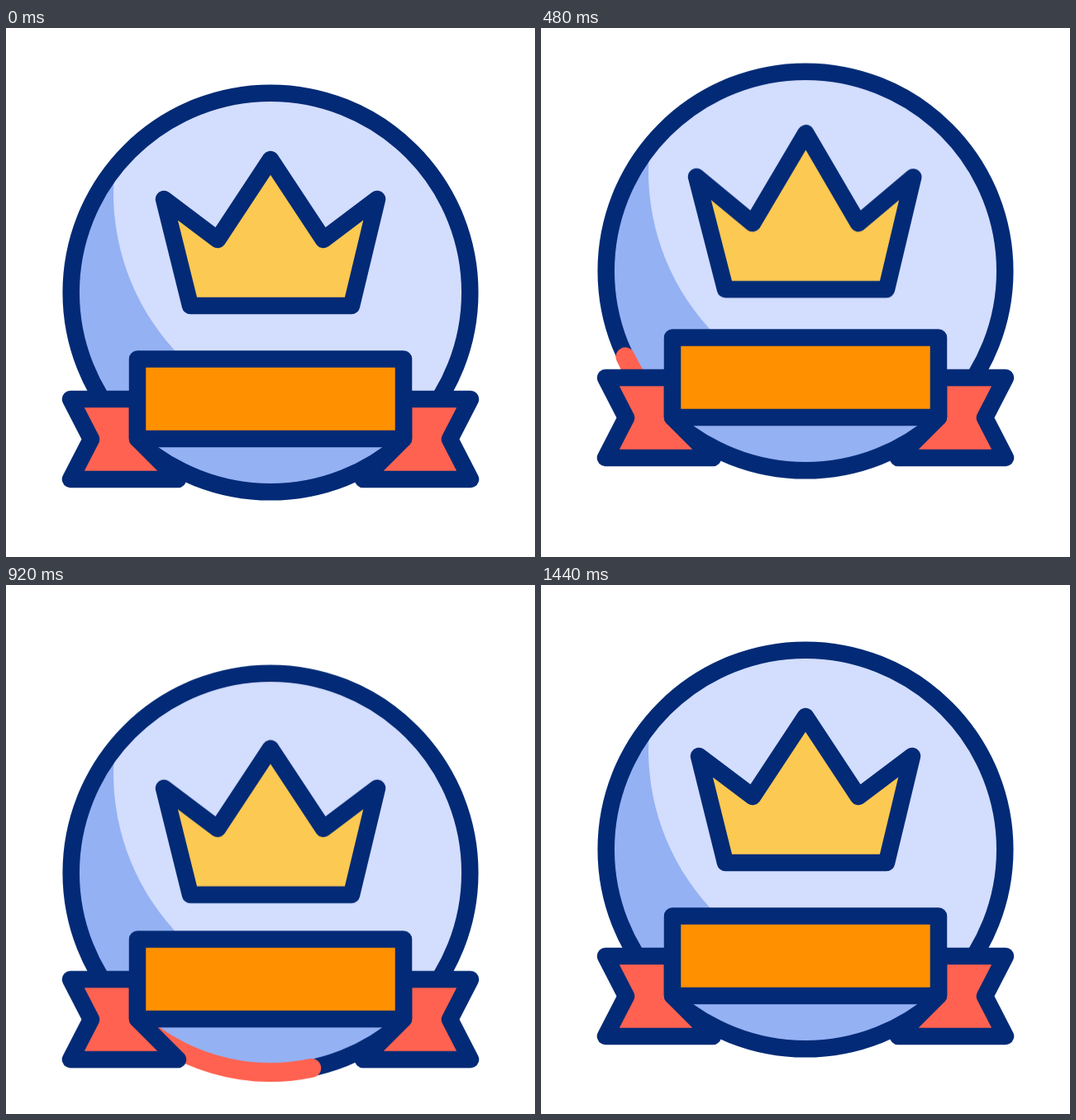
Animation, 640 px wide and 640 px high, one loop 1480 ms. Source, as an HTML page:

```html
<!DOCTYPE html>
<html lang="en">
<head>
<meta charset="utf-8">
<title>Crown badge</title>
<style>
  @property --head { syntax: "<length>"; inherits: false; initial-value: 0px; }
  @property --tail { syntax: "<length>"; inherits: false; initial-value: 0px; }

  html, body { margin: 0; width: 100%; height: 100%; overflow: hidden; background: #fff; }
  svg { display: block; width: 100%; height: 100%; }

  :root {
    --navy: #022a76;
    --coral: #ff6250;
    --ease: cubic-bezier(.3333, 0, .6667, 1);
    --loop: 1480ms var(--ease) infinite;
  }

  .line { stroke: var(--navy); stroke-width: 20.5; stroke-linejoin: round; }
  .badge { animation: bob var(--loop); }
  .crown { animation: dip var(--loop); }
  .spikes {
    fill: #fcc952;
    d: path("M223 336L191 207L256 256L320 159L384 256L449 207L418 336Z");
    animation: stretch var(--loop);
  }
  .ribbon {
    fill: var(--coral);
    d: path("M159 449H78L103 497.5L78 546H208L159 497Z");
    animation: flap var(--loop);
  }
  .sweep {
    fill: none;
    stroke: var(--coral);
    stroke-width: 23;
    stroke-linecap: round;
    stroke-dasharray: calc(var(--head) - var(--tail)) 720px;
    stroke-dashoffset: calc(0px - var(--tail));
    animation: head var(--loop), tail var(--loop);
  }

  @keyframes bob {
    0%, 2.7% { transform: translateY(0); }
    32.8% { transform: translateY(-26px); }
    63.85% { transform: translateY(28.5px); }
    94.6%, 100% { transform: translateY(0); }
  }
  @keyframes dip {
    0%, 24.5% { transform: translateY(0); }
    50% { transform: translateY(26.5px); }
    71.6%, 100% { transform: translateY(0); }
  }
  @keyframes stretch {
    0%, 27% { d: path("M223 336L191 207L256 256L320 159L384 256L449 207L418 336Z"); }
    39.2% { d: path("M223 336L184 190L256 256L321 131L384 256L452 191L418 336Z"); }
    58.1%, 100% { d: path("M223 336L191 207L256 256L320 159L384 256L449 207L418 336Z"); }
  }
  @keyframes flap {
    0%, 2.7% { d: path("M159 449H78L103 497.5L78 546H208L159 497Z"); }
    12.2% { d: path("M159 449H45L66 497.5L45 546H208L159 497Z"); }
    21.6% { d: path("M159 449H85L115 497.5L85 546H208L159 497Z"); }
    31.1%, 100% { d: path("M159 449H78L103 497.5L78 546H208L159 497Z"); }
  }
  @keyframes head {
    0%, 28.4% { --head: 0px; }
    57.4%, 100% { --head: 360px; }
  }
  @keyframes tail {
    0%, 40.3% { --tail: 0px; }
    69.6%, 100% { --tail: 360px; }
  }
</style>
</head>
<body>
<svg viewBox="0 0 640 640">
  <clipPath id="disc"><circle cx="320" cy="320" r="240"/></clipPath>
  <g class="badge">
    <circle cx="320" cy="320" r="240" fill="#94b1f3"/>
    <circle cx="411" cy="200" r="281" fill="#d3ddfd" clip-path="url(#disc)"/>
    <circle class="line" cx="320" cy="320" r="241.3" fill="none"/>
    <circle class="sweep" cx="320" cy="320" r="241.5" pathLength="360" transform="rotate(135 320 320)"/>
    <path class="line ribbon"/>
    <g transform="translate(640 0) scale(-1 1)"><path class="line ribbon"/></g>
    <rect class="line" x="159" y="400.5" width="322" height="96.5" fill="#ff9100"/>
    <g class="crown"><path class="line spikes"/></g>
  </g>
</svg>
</body>
</html>
```
